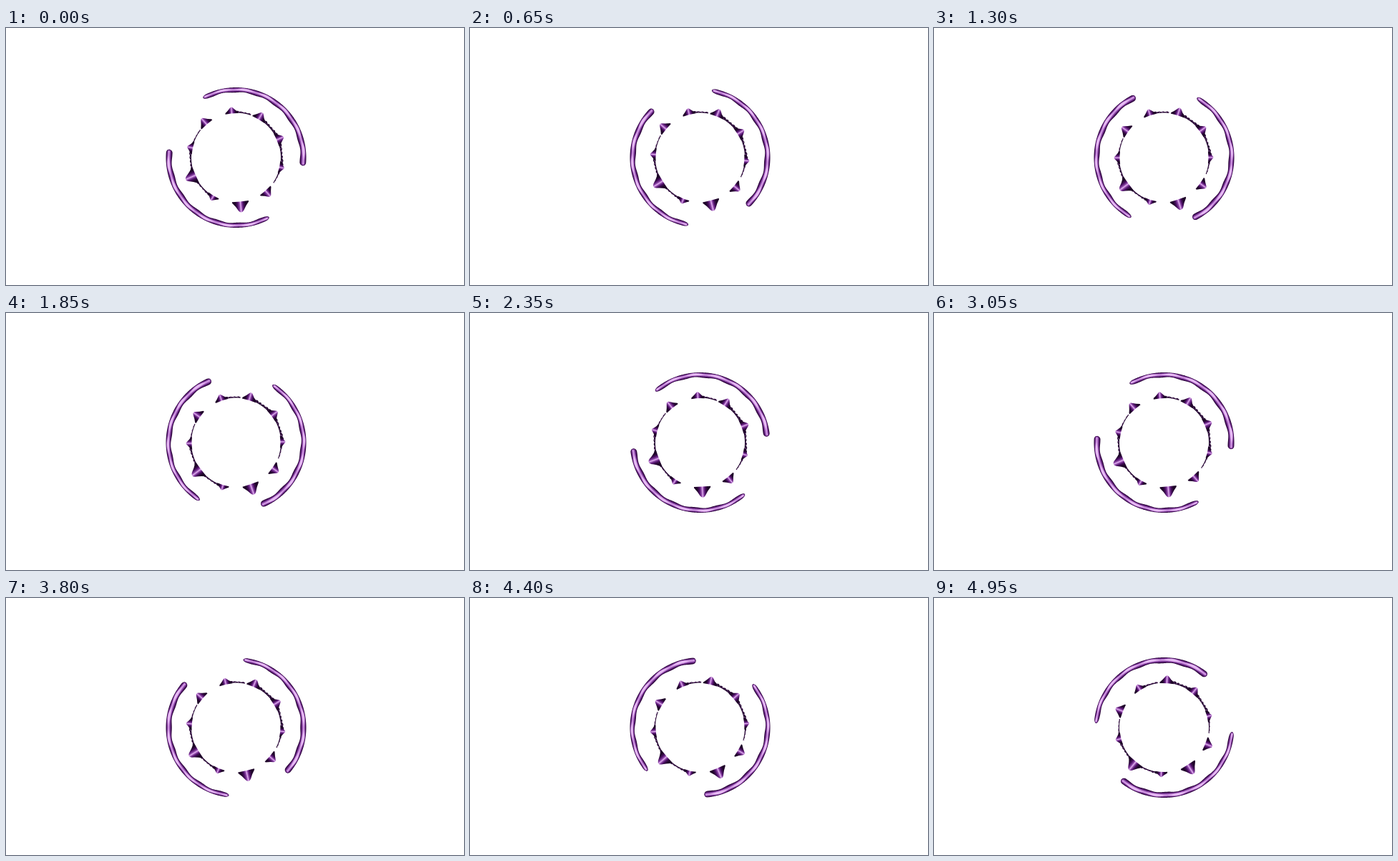
An HTML page that plays this animation: 640 by 359 pixels, repeating every 5 s.

```html
<!DOCTYPE html>
<html lang="en">
<head>
<meta charset="utf-8">
<title>Spinning rings</title>
<style>
  html, body { margin: 0; width: 100%; height: 100%; overflow: hidden; background: #fff; }
  svg { display: block; width: 100%; height: 100%; }
</style>
</head>
<body>
<svg viewBox="0 0 640 359">
  <defs>
    <linearGradient id="metal">
      <stop offset="0.2" stop-color="#1e0428"/>
      <stop offset="0.34" stop-color="#4a0f63"/>
      <stop offset="0.43" stop-color="#8d45a8"/>
      <stop offset="0.5" stop-color="#e2b2f0"/>
      <stop offset="0.57" stop-color="#8d45a8"/>
      <stop offset="0.68" stop-color="#4a0f63"/>
      <stop offset="0.82" stop-color="#1e0428"/>
    </linearGradient>
  </defs>
  <g transform="translate(321.5 181)">
    <g id="outer"></g>
    <g id="inner"></g>
  </g>
</svg>
<script>
const LOOP = 5000, STEP = 50, RESET = 40;
const outer = document.getElementById('outer');
const inner = document.getElementById('inner');
const rad = Math.PI / 180;

function add(parent, name, attrs) {
  const el = document.createElementNS('http://www.w3.org/2000/svg', name);
  for (const key in attrs) el.setAttribute(key, attrs[key]);
  parent.appendChild(el);
  return el;
}

const polar = (r, deg) =>
  (r * Math.cos(deg * rad)).toFixed(2) + ' ' + (r * Math.sin(deg * rad)).toFixed(2);

// closed band between two radii that vary with the angle
function band(from, to, lo, hi) {
  const n = Math.ceil((to - from) * 2), a = [], b = [];
  for (let i = 0; i <= n; i++) {
    const deg = from + (to - from) * i / n;
    a.push(polar(hi(deg), deg));
    b.unshift(polar(lo(deg), deg));
  }
  return 'M' + a.concat(b).join('L') + 'Z';
}

// outer arcs: round ends, the leading one fuller, shaded in nested layers
const HALF = 63, EDGE = 98;

const round = (x, size) => {
  const k = Math.max(0, 1 - x / size);
  return Math.sqrt(Math.max(0, 1 - k * k));
};
const thick = deg => 7.3 + 0.6 * Math.sin(deg * 0.33 + 1) + 1.1 * deg / HALF;
const cap = deg => round(HALF + deg, 4) * round(HALF - deg, 2.8);

const shades = [
  ['#30083f', 1, 0],
  ['#5d1f78', 0.76, 0.06],
  ['#9350ad', 0.57, 0.15],
  ['#c585d9', 0.4, 0.35],
  ['#e8bdf4', 0.22, 0.8]
];

for (const turn of [0, 180]) {
  const arc = add(outer, 'g', { transform: `rotate(${turn})` });
  shades.forEach(([fill, size, wave], i) => {
    const mid = d => EDGE - thick(d) * (0.5 - 0.02 * i);
    const half = d => thick(d) * cap(d) * 0.5 * size * (1 + wave * Math.sin(d * 0.33 + 4));
    add(arc, 'path', {
      d: band(-HALF + i * 0.4, HALF - i * 0.4, d => mid(d) - half(d), d => mid(d) + half(d)),
      fill
    });
  });
}

// inner ring: ten spikes and the speckled pieces between them
const FIRST = 12.5, GAP = 36, BASE = 62.6;
const heights = [6.5, 10, 14.5, 7, 14.5, 7.5, 10.5, 8.5, 10.5, 10];
// piece after each spike: share of the gap and thickness
const links = [[0.6, 2.2], [0, 0], [0, 0], [1, 3], [1, 3.4], [0.7, 2], [0, 0], [0.68, 3], [1, 4.4], [1, 4]];

links.forEach(([share, width], i) => {
  if (!share) return;
  const from = FIRST + GAP * i, to = from + GAP * share;
  const w = d => width * (0.78 + 0.22 * Math.cos((d - FIRST) * 10 * rad) + 0.12 * Math.sin(d * 1.3));
  add(inner, 'path', {
    d: band(from, to, () => BASE - 0.1, d => BASE - 0.1 + w(d)),
    fill: '#240631'
  });
  add(inner, 'path', {
    d: `M${polar(BASE + 1.4, from)}A64 64 0 0 1 ${polar(BASE + 1.4, to)}`,
    fill: 'none', stroke: '#cf9ade', 'stroke-width': 0.9,
    'stroke-dasharray': '1 3.2 1.3 4.1 0.8 2.8'
  });
});

heights.forEach((h, i) => {
  const w = 5.5 + h * 0.42, tip = h * 0.25;
  const sink = h * 0.1;
  add(inner, 'path', {
    transform: `rotate(${FIRST + GAP * i + 90}) translate(0 ${-BASE})`,
    d: `M${-w} 1.2 L${-w} -0.4 Q${-w * 0.62} ${-h * 0.36} ${-tip} ${-h * 0.82}`
      + `Q0 ${-h * 1.14} ${tip} ${-h * 0.82}`
      + `Q${w * 0.62} ${-h * 0.36} ${w} -0.4 L${w} 1.2 Q0 ${sink - 0.8} ${-w} 1.2Z`,
    fill: 'url(#metal)'
  });
});

// slow, fast, slow; the turn starts over at RESET
function angle(step) {
  const u = step - RESET;
  const swing = 2 * u - 100 / Math.PI * Math.sin(u * Math.PI / 50);
  return swing + (u < 0 ? 61.3 : -12.5);
}

function draw(now) {
  const a = angle(Math.floor(now % LOOP / STEP));
  outer.setAttribute('transform', `rotate(${a - 56})`);
  inner.setAttribute('transform', `rotate(${-a * 0.22})`);
}

let began;
function tick(now) {
  if (began === undefined) began = now;
  draw(now - began);
  requestAnimationFrame(tick);
}
draw(0);
requestAnimationFrame(tick);
</script>
</body>
</html>
```
